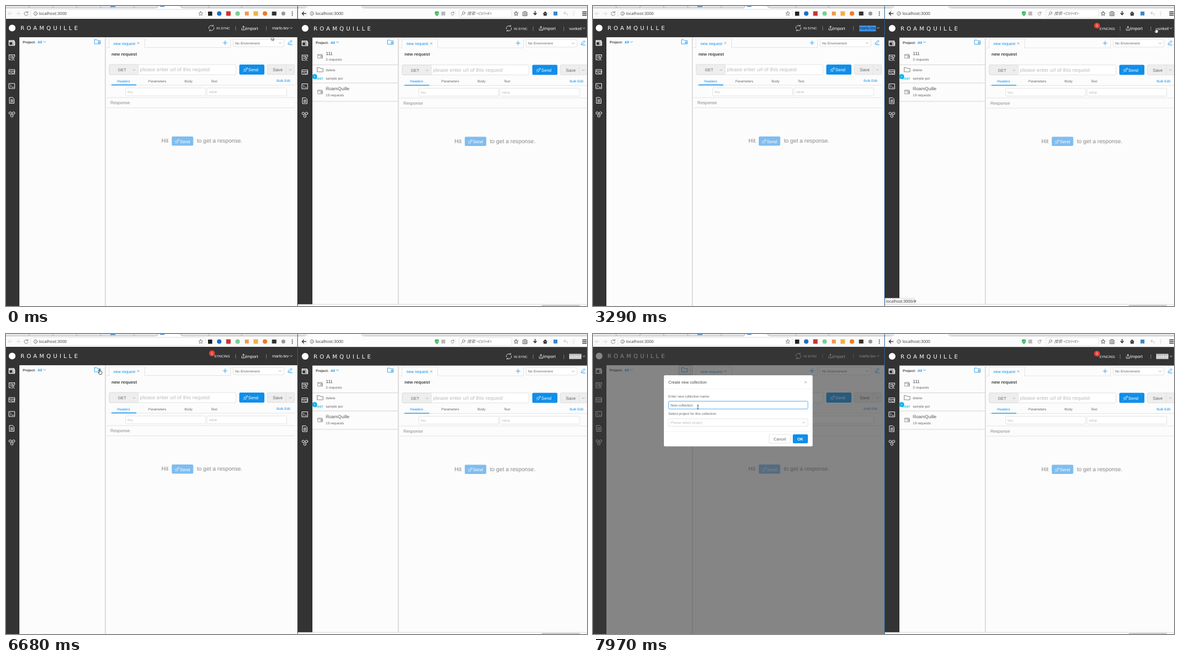
Recreate the animation shown at these times as an HTML page. Size 1041 by 538 pixels, loop 8 s.

```html
<!DOCTYPE html>
<html lang="en">
<head>
<meta charset="utf-8">
<title>Request client in two browsers</title>
<style>
html, body { margin: 0; width: 100%; height: 100%; overflow: hidden; background: #fff; }
svg { display: block; }
text { font-family: "Liberation Sans", Arial, sans-serif; fill: #666; white-space: pre; text-rendering: geometricPrecision; }
.s { font-size: 6.2px; } .m { font-size: 7.2px; } .l { font-size: 7.8px; } .xl { font-size: 8.1px; }
.url { font: 7.4px "Open Sans", "Noto Sans", sans-serif; fill: #333; }
.brand { font: 10px "DejaVu Sans", sans-serif; letter-spacing: 4.1px; fill: #fff; }
.b { font-weight: bold; fill: #444; }
text.w { fill: #fff; } text.blue { fill: #108ee9; } text.pale { fill: #bbb; } text.grey { fill: #888; }
.line { fill: none; stroke: #666; stroke-width: .8; stroke-linejoin: round; stroke-linecap: round; }
.line.w { stroke: #f4f4f4; } .line.blue { stroke: #108ee9; } .line.grey { stroke: #999; }
.box { fill: #fff; stroke: #d9d9d9; stroke-width: .7; }
.btn { fill: #eee; stroke: #d9d9d9; stroke-width: .7; }
.rule { stroke: #ddd; stroke-width: .8; }

/* 1% = 80 ms */
.anim { animation: 8s step-end infinite; }
.fade { animation: 8s linear infinite; }
.edge { animation-name: edge; }
.syncL { animation-name: syncL; }
.syncR { animation-name: syncR; }
.spin { animation: spin 1s linear infinite; transform-box: fill-box; transform-origin: center; }
.menuL { animation-name: menuL; }
.menuR { animation-name: menuR; }
.pickL { animation-name: pickL; }
.pickR { animation-name: pickR; }
.pickFill { animation-name: pickFill; }
.status { animation-name: status; }
.hover { animation-name: hover; }
.folderHot { animation-name: folderHot; }
.mask { animation-name: mask; }
.modal { animation-name: modal; transform-origin: 171px 67px; }
.caret { animation-name: caret; }
.cursor { animation-name: move; }
.arrow { animation-name: arrow; }
.hand { animation-name: hand; }
.beam { animation-name: beam; }
@keyframes edge { 0% { fill: #333 } 4.25%, 100% { fill: #2a5f98 } }
@keyframes syncL { 0%, 26.1%, 88.6%, 100% { opacity: 0 } 18.1%, 80.6% { opacity: 1 } }
@keyframes syncR { 0%, 45.5% { opacity: 0 } 36.6%, 99.6%, 100% { opacity: 1 } }
@keyframes spin { to { transform: rotate(360deg) } }
@keyframes menuL { 0%, 12.7%, 18.4%, 100% { opacity: 0 } 14%, 15.2% { opacity: 1 } 16.3%, 17.4% { opacity: .84 } }
@keyframes menuR { 0%, 52%, 60.2%, 100% { opacity: 0 } 53.5%, 58.6% { opacity: 1 } }
@keyframes pickL { 0%, 70.7%, 100% { opacity: 0 } 13% { opacity: 1 } }
@keyframes pickR { 0% { opacity: 0 } 52.5%, 100% { opacity: 1 } }
@keyframes pickFill { 0% { fill: #8ccaf4 } 70.7%, 100% { fill: #c2c2c2 } }
@keyframes status { 0%, 36.5%, 67.6%, 100% { opacity: 0 } 36.6%, 65% { opacity: 1 } 66.3%, 67.5% { opacity: .2 } }
@keyframes hover { 0%, 63%, 70%, 100% { fill: #555 } 65%, 67.5% { fill: #2f5b79 } }
@keyframes folderHot { 0% { opacity: 0 } 90.2%, 100% { opacity: 1 } }
@keyframes mask { 0% { opacity: 0 } 93.5% { opacity: .75 } 94.8%, 100% { opacity: 1 } }
@keyframes modal {
  0% { opacity: 0; transform: scale(.955) }
  93.5% { opacity: .93; transform: scale(.955) }
  94.8%, 100% { opacity: 1; transform: none }
}
@keyframes caret { 0%, 99.6%, 100% { opacity: 0 } 93.5% { opacity: 1 } }
@keyframes move {
  0%, .99% { transform: translate(475.5px, 54px) }
  1%, 4.2% { transform: translate(474px, 51.5px) }
  8% { transform: translate(490px, 40px) }
  12.5%, 18.2% { transform: translate(506px, 35px) }
  24.2% { transform: translate(686px, 62px) }
  28% { transform: translate(800px, 78px) }
  35.5%, 46% { transform: translate(1008.5px, 39px) }
  52%, 58.7% { transform: translate(1021px, 40px) }
  61% { transform: translate(900px, 78px) }
  64% { transform: translate(600px, 148px) }
  66.3%, 67.5% { transform: translate(303px, 270px) }
  68.7%, 70.7% { transform: translate(264px, 270px) }
  75% { transform: translate(210px, 160px) }
  79.1% { transform: translate(140px, 72px) }
  82%, 99.5% { transform: translate(168px, 63px) }
  99.6%, 100% { transform: translate(188px, 131px) }
}
@keyframes arrow { 0%, 18.4%, 61% { opacity: 1 } 5%, 36%, 81%, 100% { opacity: 0 } }
@keyframes hand { 0%, 18.4%, 61%, 99.6%, 100% { opacity: 0 } 5%, 36%, 81% { opacity: 1 } }
@keyframes beam { 0% { opacity: 0 } 99.6%, 100% { opacity: 1 } }
</style>
</head>
<body>
<svg width="1041" height="538" viewBox="0 0 1041 538">
<defs>
  <path id="chev" d="M-2-1 0 1 2-1"/>
  <path id="cross" d="M-1.7-1.7 1.7 1.7M1.7-1.7-1.7 1.7"/>
  <path id="reload" d="M2.8-1.8A3.4 3.4 0 1 0 3.4 1M3.2-4V-1.5H.7"/>
  <path id="folder" d="M-5-3.5H-1.5L0-2H5V4H-5Z"/>
  <path id="rocket" d="M-3.5 3.5-1.7 1.7M-3-.5-1-1Q1-3.5 3.7-3.7 3.5-1 1 1L.5 3-1 1.5-2 .5ZM1-1.3h.3"/>
  <path id="pencil" d="M-3.5 3-3 .5 2-4 3.5-2.5-1 2.5ZM-1 4H4"/>
  <path id="star" d="M0-3.7 1.1-1.2 3.7-1 1.7.8 2.4 3.5 0 2-2.4 3.5-1.7.8-3.7-1-1.1-1.2Z"/>
  <path id="turn" d="M-4.6 1A4.7 4.7 0 0 1 3-3.6M4.6-1A4.7 4.7 0 0 1-3 3.6M3.4-5.5 3.1-3.4 1-3.8M-3.4 5.5-3.1 3.4-1 3.8"/>
  <g id="wallet"><path d="M-5-4H4V-2H5V4.5H-5ZM-5-2H4"/><path d="M1.5 0H5V2.5H1.5Z"/></g>
  <g id="info" class="line"><circle r="3.2"/><path d="M0-.3V1.7M0-1.7v.1"/></g>
  <g id="sendMark"><use href="#rocket" class="line w" x="-13"/><text class="l w" x="-8" y="2.7">Send</text></g>

  <g id="side" class="line w" style="stroke-width:1">
    <use href="#wallet" x="10.5" y="66" stroke-width="1.3"/>
    <path d="M5.5 87.5H15.5M5.5 87.5V96.5H9M15.5 87.5V91M7.5 90H13M7.5 93H10"/>
    <circle cx="12.5" cy="93" r="1.6"/><path d="M10.5 97.5Q12.5 93.5 15 97.5"/>
    <path d="M5.5 114H15.5V122H5.5ZM5.5 117H15.5M8 119.5H10M11 120 12.5 121 16 117.5"/>
    <path d="M5.5 139H15.5V148H5.5ZM7.5 141.500 9.5 143.500 7.5 145.500M11 145.500H13.5"/>
    <path d="M6.5 164H12L14.5 166.500V174.500H6.5ZM8.5 168H12.5M8.5 170H12.5M8.5 172H12.5"/>
    <circle cx="7.5" cy="192" r="2.2"/><circle cx="13.5" cy="192" r="2.2"/><circle cx="10.5" cy="197" r="2.2"/>
  </g>

  <g id="app">
    <rect y="23" width="522" height="515" fill="#fcfcfc"/>
    <rect y="23" width="522" height="33" fill="#333"/>
    <rect y="23" width="24" height="515" fill="#333"/>
    <use href="#side"/>
    <circle cx="11" cy="39.5" r="6" fill="#fff"/>
    <text class="brand" x="26" y="43.3">ROAMQUILLE</text>
    <rect x="177" y="56" width="2" height="482" fill="#ddd"/>
    <text class="s b" x="30" y="67">Project:</text>
    <text class="s blue" x="56.5" y="67" font-weight="bold">All</text>
    <use href="#chev" class="line blue" x="69" y="64.5"/>
    <use href="#folder" class="line blue" x="164" y="64"/>
    <path class="line blue" d="M164.500 65.500h4M166.500 63.500v4"/>
    <path class="rule" fill="none" d="M180 74.500H184.500V58.500H248.500V74.500H402.500V58"/>
    <text class="m blue" x="192.5" y="69.5">new request</text>
    <use href="#cross" class="line grey" x="237" y="66.5"/>
    <path class="line blue" d="M389 66h7M392.500 62.500v7"/>
    <rect class="box" x="407" y="59.5" width="91" height="13.5" rx="1.5"/>
    <text class="s" x="410.5" y="68.5">No Environment</text>
    <use href="#chev" class="line grey" x="491" y="66.5"/>
    <use href="#pencil" class="line blue" x="509" y="65.5"/>
    <text class="l b" x="189" y="88.7">new request</text>
    <rect class="box" x="185" y="105" width="227" height="18" rx="2"/>
    <rect class="btn" x="185" y="105" width="52" height="18" rx="2"/>
    <text class="m" x="200.5" y="117">GET</text>
    <use href="#chev" class="line grey" x="229.5" y="115"/>
    <text class="pale" font-size="9.3" x="240" y="117">please enter url of this request</text>
    <rect x="418" y="105" width="45" height="18" rx="2" fill="#108ee9"/>
    <use href="#sendMark" x="442" y="114.5"/>
    <rect class="btn" x="468" y="105" width="49" height="18" rx="2"/>
    <path class="rule" d="M502 105v18"/>
    <text class="l" x="478" y="117">Save</text>
    <use href="#chev" class="line grey" x="509.5" y="114.5"/>
    <path class="rule" d="M185 142H517M180 164.300H517M180 182.500H517"/>
    <path d="M189 141.500H233.500" stroke="#108ee9" stroke-width="1.4"/>
    <text class="s blue" x="199" y="136.5">Headers</text>
    <text class="s" x="255" y="136.8">Parameters</text>
    <text class="s" x="320" y="136.8">Body</text>
    <text class="s" x="367" y="136.8">Test</text>
    <text class="s blue" x="485" y="136">Bulk Edit</text>
    <rect class="box" x="214.5" y="147" width="143" height="14" rx="1.5"/>
    <rect class="box" x="360" y="147" width="143" height="14" rx="1.5"/>
    <text class="s pale" x="218" y="156">key</text>
    <text class="s pale" x="363.5" y="156">value</text>
    <text class="l grey" x="187" y="176">Response</text>
    <text class="grey" font-size="10.3" x="278.5" y="245">Hit</text>
    <rect x="297" y="234" width="38.5" height="16.5" rx="2" fill="#7fbdf0"/>
    <use href="#sendMark" x="319.5" y="243"/>
    <text class="grey" font-size="10.2" x="342" y="245">to get a response.</text>
  </g>

  <g id="account">
    <use href="#turn" class="line w" x="368" y="39.5"/>
    <text class="w" font-size="6" x="377" y="42">IN SYNC</text>
    <path d="M411.500 36v8M466.500 36v8" stroke="#888" stroke-width=".8"/>
    <path class="line w" d="M422.500 40v3h6v-3M425.500 41.500v-5.500M423.500 38l2-2 2 2"/>
    <text class="l w" x="429.5" y="42.5">Import</text>
    <use href="#chev" class="line w" x="511" y="39.5"/>
  </g>
  <g id="badge">
    <circle cx="369" cy="34.5" r="5.2" fill="#f04134"/>
    <text class="s w" x="367.3" y="36.8">1</text>
    <text class="s w" x="373" y="42.2">SYNCING</text>
  </g>
  <g id="menu">
    <rect x="412" y="46" width="102" height="49" rx="2" fill="#f2f2f2" stroke="#ccc" stroke-width=".6"/>
    <g class="line grey">
      <path d="M417 52.500V50.500h3M418 53.500h4v2.500h-4z"/>
      <path d="M421 67.500a2.500 2.500 0 1 0 0 3.500M419 69.300h4"/>
      <circle cx="419.5" cy="85" r="2.6"/><use href="#cross" transform="translate(419.500 85) scale(.6)"/>
    </g>
    <g opacity=".75">
      <text class="s" x="424" y="55.7">Change password</text>
      <text class="s" x="424" y="71.7">Logout</text>
      <text class="s" x="424" y="87.3">Logout &amp; Clear cache</text>
    </g>
  </g>
</defs>

<!-- left browser -->
<rect width="522" height="23" fill="#fafafa"/>
<rect width="522" height="3" fill="#e6e8ea"/>
<path d="M0 3.500H270M316 3.500H522" stroke="#b5b5b5"/>
<path d="M270 4 273 0H312L316 4Z" fill="#fff"/>
<path class="line grey" d="M40 0l3 3M83 3l3-3M125 0l3 3M168 0l3 3M228 0l3 3M270 3l3-3M312 0l4 3M362 0l3 3M421 3l3-3"/>
<path d="M187 1h9M276 .500h8" stroke="#357ab8" stroke-width="1.5"/>
<path class="line" style="stroke:#ccc" d="M11 13.500H4M7 10.500 4 13.500 7 16.500M18 13.500h7M22 10.500l3 3-3 3"/>
<use href="#reload" class="line" x="36" y="13.5"/>
<rect class="box" x="45" y="6.5" width="312" height="14" rx="1.5"/>
<use href="#info" x="53" y="13.5"/>
<text class="url" x="59" y="16">localhost:3000</text>
<use href="#star" class="line" x="349" y="13.5"/>
<g>
  <rect x="362" y="10" width="7.5" height="7.5" fill="#222"/>
  <circle cx="382" cy="13.5" r="4" fill="#1d6fc4"/>
  <rect x="394.5" y="9.5" width="8" height="8" fill="#c8372d"/>
  <circle cx="415" cy="13.5" r="4" fill="#7ccf97"/>
  <rect x="428" y="10" width="7" height="7" fill="#ee9b55"/>
  <rect x="443.5" y="9.5" width="8" height="8" fill="#efb24a"/>
  <circle cx="464" cy="13.5" r="4" fill="#ef7a24"/>
  <rect x="476.5" y="10" width="8" height="7" fill="#333"/>
  <circle cx="497" cy="13.5" r="3.5" fill="#999"/>
  <path d="M513 9.800v7.600" stroke="#444" stroke-width="1.6" stroke-dasharray="1.6 1.4"/>
</g>
<use href="#app"/>
<g class="anim folderHot">
  <rect x="154" y="56.5" width="21" height="16.5" fill="#eee" stroke="#aaa" stroke-width=".7"/>
  <use href="#folder" class="line blue" x="164" y="64"/>
</g>
<use href="#account"/>
<text class="m w" x="477" y="42">marlo.tev</text>
<g class="anim pickL">
  <rect x="477" y="35" width="30" height="10.5" fill="#3c8fe6"/>
  <text class="m" x="477" y="42" style="fill:#172a3e">marlo.tev</text>
</g>
<g class="anim syncL">
  <rect x="360" y="26" width="45" height="28" fill="#333"/>
  <use href="#turn" class="line w spin" x="365" y="39.5"/>
  <use href="#badge"/>
</g>
<use href="#menu" class="fade menuL"/>

<rect class="anim mask" y="23" width="522" height="515" fill="#373737" fill-opacity=".6"/>
<g class="anim modal">
  <rect x="127" y="74" width="266.5" height="127.5" rx="2" fill="#fff"/>
  <path d="M127 98.500H393.500M127 175H393.500" stroke="#eee" stroke-width=".7"/>
  <text class="m" x="135" y="88.7" style="fill:#444">Create new collection</text>
  <use href="#cross" class="line grey" x="381" y="86.5"/>
  <text class="s" x="135" y="113.7">Enter new collection name:</text>
  <rect x="135.5" y="120.5" width="249.5" height="14" rx="1.5" fill="#fff" stroke="#49a9ee" stroke-width=".9"/>
  <text class="s" x="139" y="129.8">New collection</text>
  <path class="anim caret" d="M139 123.500v8" stroke="#222" stroke-width=".7"/>
  <text class="s" x="135" y="145.2">Select project for this collection:</text>
  <rect class="box" x="135" y="152" width="250" height="13.5" rx="1.5"/>
  <text class="s pale" x="139" y="161.2">Please select project</text>
  <use href="#chev" class="line grey" x="377.5" y="159"/>
  <rect class="box" x="315.5" y="180" width="38.5" height="16" rx="2"/>
  <text class="m" x="323.5" y="190.7">Cancel</text>
  <rect x="358" y="180" width="27" height="16" rx="2" fill="#108ee9"/>
  <text class="m w" x="366" y="190.7" font-weight="bold">OK</text>
</g>

<!-- right browser -->
<rect x="523" width="518" height="538" fill="#fcfcfc"/>
<path d="M523 1.500H536M640 1.500H1041" stroke="#e6e8ea" stroke-width="3"/>
<path d="M523 3.500H536M640 3.500H1041" stroke="#b5b5b5"/>
<path class="line grey" d="M536 0l3 3M637 3l3-3"/>
<circle cx="534" cy="13.5" r="5.5" fill="#fff" stroke="#ddd" stroke-width=".7"/>
<path class="line" style="stroke:#333;stroke-width:1.4" d="M537.500 13.500h-7M533.500 10.500l-3 3 3 3"/>
<use href="#info" x="548" y="13.5"/>
<text class="url" x="554.5" y="16">localhost:3000</text>
<path d="M768.500 10 772 9.500 775.500 10V14Q775 16.500 772 18 769 16.500 768.500 14Z" fill="#3ab45a"/>
<path class="line w" d="M770.300 13.500l1.400 1.500 2.300-3"/>
<rect x="780" y="10" width="7" height="7" fill="#bbb"/>
<use href="#reload" class="line" transform="translate(800 13.500) scale(.8)"/>
<rect class="box" x="812" y="6.5" width="94" height="14" rx="1"/>
<g class="line"><circle cx="820" cy="12.5" r="2.3"/><path d="M818.300 14.300 816 17"/></g>
<text x="826" y="16" font-size="7.4" style="font-family:'Open Sans','Noto Sans CJK SC','Noto Sans CJK',sans-serif;font-style:italic">搜索 &lt;Ctrl+K&gt;</text>
<g class="line" style="stroke:#333">
  <use href="#star" x="914" y="13.5"/>
  <path d="M926.500 11h7v6.500h-7zM928.500 10h3M928 13.500h4M928 15.500h4"/>
  <path stroke-width="1.5" d="M948 9.500v6M945.500 13l2.500 2.700 2.500-2.700"/>
  <path d="M962.500 13.500 966 10l3.500 3.500M963.500 13v4h5v-4" fill="#333"/>
  <rect x="981" y="10" width="7" height="7" style="fill:#3d88c9;stroke:none"/>
  <path style="stroke:#aaa" d="M1006 16.500q.500-4-6-4M1002 10l-2.500 2.500 2.500 2.500"/>
  <path style="stroke:#ccc" d="M1017 10v7"/>
  <path stroke-width="1.3" d="M1033 10.500h7M1033 13.500h7M1033 16.500h7"/>
</g>
<rect x="523" y="24" width="3" height="511" fill="#333"/>
<rect x="523" y="23" width="518" height="2" fill="#333"/>
<g transform="translate(525 .6)">
  <use href="#app"/>
  <path d="M24 104.900H177M24 137.400H177M24 170.400H177" stroke="#d5d5d5" stroke-width="1.2"/>
  <use href="#wallet" class="line" transform="translate(38 89.400) scale(.8)"/>
  <use href="#wallet" class="line" transform="translate(38 153.400) scale(.8)"/>
  <use href="#folder" class="line" x="38" y="113.4"/>
  <text class="xl" x="48" y="87" style="fill:#444">111</text>
  <text class="s" x="48" y="97.2">3 requests</text>
  <text class="s" x="48" y="116.2">delete</text>
  <text class="s" x="48" y="131.4">sample put</text>
  <text class="xl fade hover" x="48" y="150.4">RoamQuille</text>
  <text class="s" x="48" y="161.2">19 requests</text>
  <text font-size="5" x="29.5" y="131.4" style="fill:#0aaede;font-weight:bold;font-style:italic">POST</text>
  <circle cx="28" cy="125.9" r="4.6" fill="#11b0e8"/>
  <text class="w" font-size="5" x="26.6" y="127.7">1</text>
</g>
<rect x="523" y="535" width="518" height="3" fill="#fff"/>
<path d="M523 535.200H1041" stroke="#ccc" stroke-width=".8"/>
<path d="M960 537.200H1028" stroke="#bbb" stroke-width="1.6"/>
<use href="#account" x="533" y=".6"/>
<rect x="1033" y="34" width="8" height="12" fill="#333"/>
<use href="#chev" class="line w" x="1035.5" y="40"/>
<text class="m w" x="1009" y="42.5">vunkeil</text>
<g class="anim pickR">
  <rect class="anim pickFill" x="1009" y="35.5" width="22" height="9.5"/>
  <text class="m" x="1009" y="42.5" style="fill:#f8f8f8">vunkeil</text>
</g>
<g class="anim syncR">
  <rect x="893" y="26" width="45" height="28" fill="#333"/>
  <use href="#turn" class="line w spin" x="898.5" y="40.2"/>
  <use href="#badge" x="534" y=".6"/>
</g>
<g class="fade menuR"><use href="#menu" x="525" y="1"/></g>
<g class="fade status">
  <rect x="523" y="524" width="53" height="11" fill="#f5f5f5" stroke="#ccc" stroke-width=".6"/>
  <text class="url" x="525" y="532" style="font-size:7px">localhost:3000/#</text>
</g>
<rect class="anim edge" x="522" width="1" height="538"/>

<g class="fade cursor">
  <path class="anim arrow" d="M0 0V7.500L1.700 6 2.900 8.600 4.100 8 3 5.500H5.200Z" fill="#fff" stroke="#222" stroke-width=".7"/>
  <path class="anim hand" d="M-.8 5.500V.8Q0-.4.8.8V3.500L3.500 4.200 4 5V7.500L3 9.500H-.5L-2.800 6.300Q-2.500 5-.8 6.500Z" fill="#fff" stroke="#222" stroke-width=".8"/>
  <path class="anim beam" d="M-1.300-3.500H1.300M0-3.500V3.500M-1.300 3.500H1.300" fill="none" stroke="#222" stroke-width=".8"/>
</g>
</svg>
</body>
</html>
```
